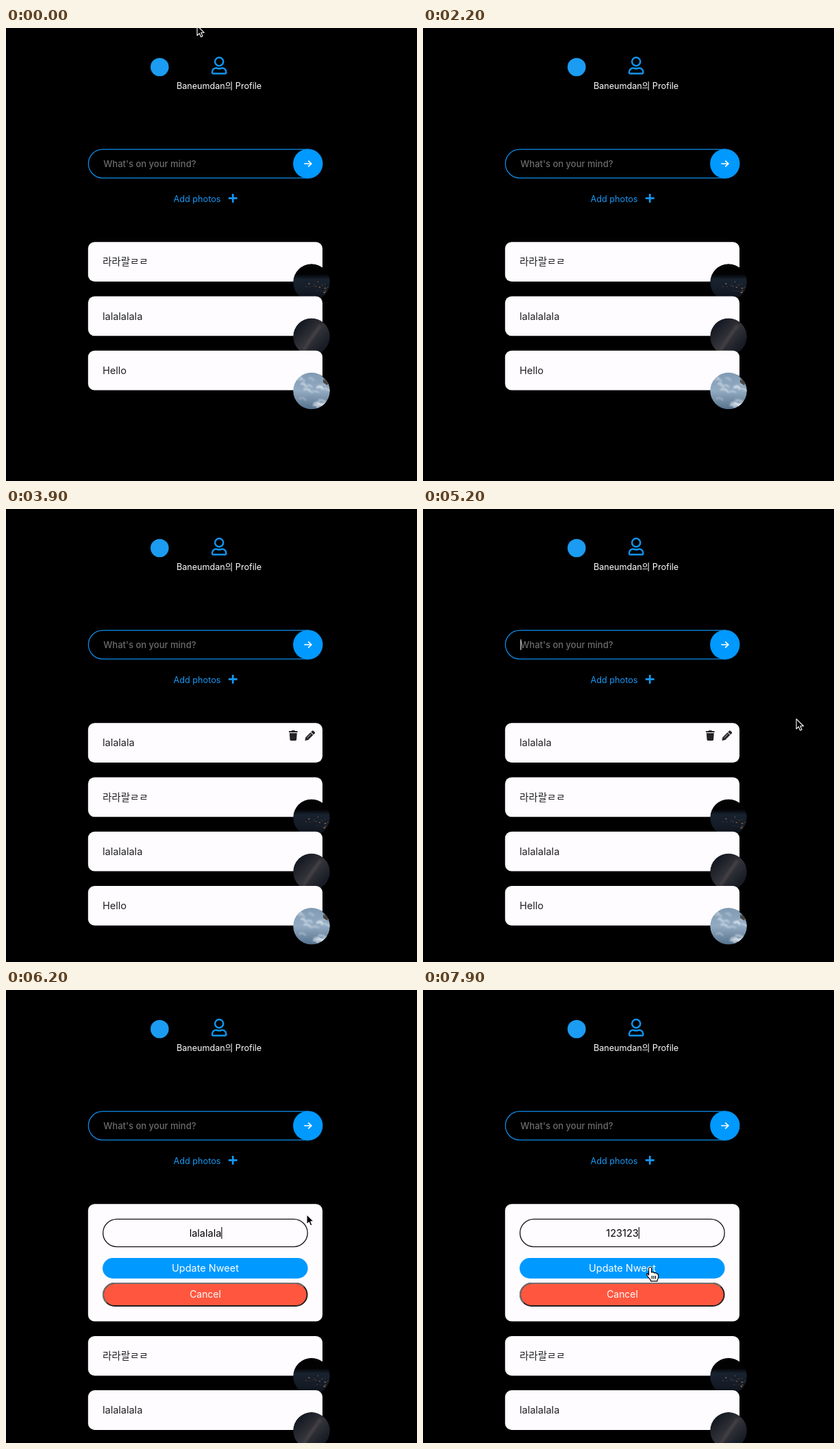
These frames come from a looping animation (600 px wide and 661 px high, 8 s). An HTML page:

```html
<!DOCTYPE html>
<html lang="en">
<head>
<meta charset="utf-8">
<title>Post feed</title>
<style>
  html, body { margin: 0; width: 100%; height: 100%; overflow: hidden; background: #000; }
  svg { display: block; width: 600px; height: 661px; }
  text { font-family: Inter, "Noto Sans CJK KR", "Noto Sans CJK", sans-serif; white-space: pre; }
  .post { font-size: 14.5px; fill: #1f1f21; }
  .mid { text-anchor: middle; }
</style>
</head>
<body>
<svg viewBox="0 0 600 661">
  <defs>
    <clipPath id="disc"><circle r="26.8"/></clipPath>
    <linearGradient id="night" x1="0" y1="0" x2="0" y2="1">
      <stop offset=".28" stop-color="#020203"/>
      <stop offset=".42" stop-color="#18222f"/>
      <stop offset=".75" stop-color="#141b26"/>
      <stop offset="1" stop-color="#0b0f16"/>
    </linearGradient>
    <linearGradient id="sky" x1="0" y1="0" x2="1" y2="1">
      <stop offset=".2" stop-color="#171b23"/>
      <stop offset=".5" stop-color="#34343b"/>
      <stop offset=".8" stop-color="#181c25"/>
    </linearGradient>
    <linearGradient id="earth" x1="0" y1="0" x2="0" y2="1">
      <stop offset="0" stop-color="#7f9bb3"/>
      <stop offset=".5" stop-color="#93abc2"/>
      <stop offset="1" stop-color="#55718c"/>
    </linearGradient>
    <filter id="soft"><feGaussianBlur stdDeviation="1.3"/></filter>

    <g id="photo0" clip-path="url(#disc)">
      <circle r="27" fill="url(#night)"/>
      <g id="lights" fill="#d98a52"/>
    </g>
    <g id="photo1" clip-path="url(#disc)">
      <circle r="27" fill="url(#sky)"/>
      <path d="M-12 20L13-17" stroke="#5a5050" stroke-width="5" opacity=".45" filter="url(#soft)"/>
    </g>
    <g id="photo2" clip-path="url(#disc)">
      <circle r="27" fill="url(#earth)"/>
      <g id="clouds" stroke="#e6edf3" fill="none" stroke-linecap="round" filter="url(#soft)"/>
      <path d="M8-28Q18-20 28-6V-28z" fill="#15181d"/>
      <path d="M17-17l8 4-2 5-6-4z" fill="#4b4543"/>
    </g>
  </defs>

  <rect width="600" height="661"/>

  <circle cx="224.3" cy="57" r="13.3" fill="#1b9cf2"/>
  <g transform="translate(299.8 41.8) scale(.0508)" fill="none" stroke="#1195f0" stroke-width="48">
    <circle cx="224" cy="144" r="120"/>
    <path d="M134 328c20 0 40 16 90 16s70-16 90-16a110 110 0 0 1 110 110v26a24 24 0 0 1-24 24H48a24 24 0 0 1-24-24v-26A110 110 0 0 1 134 328z"/>
  </g>
  <text class="mid" x="311" y="89.3" font-size="12.6" fill="#fff">Baneumdan의 Profile</text>

  <circle cx="440.5" cy="198" r="21.4" fill="#0099ff"/>
  <rect x="120.3" y="177.2" width="341.6" height="41.6" rx="20.8" fill="none" stroke="#0f90ee" stroke-width="1.2"/>
  <path d="M435.3 198H445.6M441.2 193.6L445.8 198L441.2 202.4" fill="none" stroke="#fff" stroke-width="1.7"/>
  <text id="draft" x="142.3" y="202.6" font-size="13" font-weight="500"></text>
  <rect id="caret" y="190.3" width="1.1" height="15.4" fill="#fff"/>

  <text x="244.4" y="254.4" font-size="12.7" fill="#1797f2">Add photos</text>
  <path d="M324.8 248.3H337.6M331.2 241.9V254.7" stroke="#1797f2" stroke-width="2.7"/>

  <g id="fresh">
    <rect x="119.8" y="312.3" width="342.2" height="57.8" rx="9.5" fill="#fffcff"/>
    <text class="post" x="141" y="346.4">lalalala</text>
    <g fill="#242427">
      <path d="M413 324h3.6l.8-1h3.8l.8 1h3.6v1.9H413z"/>
      <path d="M413.8 326.9h11l-.7 9.7q-.1 1.4-1.5 1.4h-6.6q-1.4 0-1.5-1.4z"/>
      <g transform="translate(436.4 338) rotate(-45)">
        <path d="M0 0L4-2.7H14.2V2.7H4zM15.2-2.7h2.4q1.4 0 1.4 1.4v2.6q0 1.4-1.4 1.4h-2.4z"/>
        <path d="M5-.6H13" stroke="#fffcff" stroke-width=".7"/>
      </g>
    </g>
  </g>

  <g id="editor">
    <rect x="119.8" y="312.3" width="342.2" height="171.2" rx="9.5" fill="#fffcff"/>
    <rect x="141.6" y="334.3" width="298.6" height="40.4" rx="20.2" fill="#fffcff" stroke="#111" stroke-width="1.3"/>
    <text id="edit" class="mid" x="291" y="359.9" font-size="14.5"></text>
    <rect id="editCaret" y="346" width="1.1" height="17" fill="#000"/>
    <rect x="141" y="391" width="299.6" height="30" rx="15" fill="#0099ff"/>
    <text class="mid" x="291" y="411.4" font-size="14.5" fill="#fff">Update Nweet</text>
    <rect x="142" y="428" width="297.6" height="33" rx="16.5" fill="#ff573f" stroke="#231f1f" stroke-width="2"/>
    <path d="M146.8 456.2A16.5 16.5 0 0 1 158.5 428H423.1A16.5 16.5 0 0 1 434.8 432.8" fill="none" stroke="#74706f" stroke-width="2"/>
    <text class="mid" x="291" y="448.8" font-size="13.9" fill="#fff">Cancel</text>
  </g>

  <g id="feed"></g>

  <g id="arrow"><path d="M0 0V14.5l3.3-3.2 2.3 5.2 2.4-1-2.2-5.2h4.6z" stroke="#fff" stroke-width="1.1" stroke-linejoin="round"/></g>
  <g id="hand" stroke="#000" stroke-width="1.2" stroke-linejoin="round">
    <path fill="#fff" d="M-2 1.5a2 2 0 0 1 4 0V7q3-1 4 .8q3-.6 3.6 1q2.4 0 2.4 2.5v3q0 2-1.5 4v1.5H1v-1.5q-4-4-5.5-7q-1-3 1-2.5l1.5 2z"/>
    <path fill="none" d="M2.8 12v4.5M5.4 12v4.5M8 12v4.5"/>
  </g>
</svg>
<script>
const NS = 'http://www.w3.org/2000/svg';
const LOOP = 8000, STEP = 100, ROW = 79.2, TOP = 312.3;
const $ = id => document.getElementById(id);

function add(parent, tag, attrs, text) {
  const node = document.createElementNS(NS, tag);
  for (const k in attrs) node.setAttribute(k, attrs[k]);
  if (text) node.textContent = text;
  parent.appendChild(node);
  return node;
}
const show = (node, on) => node.setAttribute('display', on ? 'inline' : 'none');
const moveTo = (node, x, y) => node.setAttribute('transform', `translate(${x} ${y})`);

let seed = 7;
const rnd = () => (seed = seed * 16807 % 2147483647) / 2147483647;

for (let i = 0; i < 26; i++) {
  const x = rnd() * 48 - 24;
  add($('lights'), 'circle', {
    cx: x, cy: 5 + x * x / 90 + (rnd() - .5) * 15,
    r: .35 + rnd() * .7, opacity: .25 + rnd() * .6
  });
}
for (let i = 0; i < 22; i++) {
  const x = rnd() * 50 - 28, y = rnd() * 44 - 20;
  add($('clouds'), 'path', {
    d: `M${x} ${y}q${3 + rnd() * 4} ${-5 + rnd() * 5} ${5 + rnd() * 7} ${rnd() * 4}`,
    'stroke-width': 1 + rnd() * 2.5, opacity: .3 + rnd() * .5
  });
}

const posts = ['라라랄ㄹㄹ', 'lalalalala', 'Hello'].map((text, i) => {
  const g = add($('feed'), 'g', {});
  add(g, 'rect', { x: 119.8, width: 342.2, height: 57.8, rx: 9.5, fill: '#fffcff' });
  add(g, 'text', { class: 'post', x: 141, y: 34.1 }, text);
  add(g, 'use', { href: '#photo' + i, x: 446, y: 58.8 });
  return g;
});

// Last entry of [time, value] pairs already reached
const at = (list, t) => list.reduce((v, [time, value]) => t >= time ? value : v, list[0][1]);
const typed = [[0, 0], [2400, 1], [2500, 2], [2600, 3], [2700, 4], [2900, 6], [3000, 7], [3100, 8], [3400, 0]];
const edits = [[0, 'lalalala'], [6500, 'lalala'], [6600, 'lala'], [6700, 'la'], [6800, ''],
  [7000, '1'], [7100, '12'], [7200, '123'], [7300, '1231'], [7400, '12312'], [7500, '123123']];

const trips = [
  { from: 0, to: 700, end: 700, a: [279, -3.5], b: [205, 198] },
  { from: 4900, to: 5700, end: 6200, a: [592, 296], b: [443.5, 329] },
  { from: 6200, to: 6300, end: 6700, a: [439, 327.5], b: [438, 329] },
  { from: 7500, to: 7900, end: 8000, a: [426, 334], b: [331.5, 405] }
];

function pointer(t) {
  const trip = trips.find(p => t >= p.from && t < p.end);
  if (!trip) return null;
  const p = Math.min(1, (t - trip.from) / (trip.to - trip.from));
  const k = p * p * (3 - 2 * p);
  return [0, 1].map(i => trip.a[i] + (trip.b[i] - trip.a[i]) * k);
}

function drawPointer(t, editing) {
  const pos = pointer(t);
  let hand = false, beam = false;
  if (pos) {
    const [x, y] = pos;
    hand = editing ? y > 391 && y < 421 : t > 4000 && x < 452 && y > 322;
    beam = t < 1000 && y > 177;
    moveTo($('arrow'), x, y);
    moveTo($('hand'), x, y);
  }
  show($('arrow'), pos && !hand && !beam);
  show($('hand'), hand);
}

function caretOn(t) {
  if (t < 700 || t >= 5600) return false;
  if (t >= 2400 && t < 3600) return true;
  return t < 2400 ? (t - 700) % 1000 < 500 : (t - 4100) % 1000 >= 0 && (t - 4100) % 1000 < 500;
}

function render(ms) {
  const t = Math.floor(ms % LOOP / STEP) * STEP;
  const posted = t >= 3400, editing = t >= 6200;

  const n = at(typed, t), draft = $('draft');
  draft.textContent = n ? 'lalalala'.slice(0, n) : "What's on your mind?";
  draft.setAttribute('fill', n ? '#fff' : '#6c6c6c');
  $('caret').setAttribute('x', 142.3 + (n ? draft.getComputedTextLength() : 0));
  show($('caret'), caretOn(t));

  show($('fresh'), posted && !editing);
  show($('editor'), editing);
  if (editing) {
    const value = at(edits, t);
    $('edit').textContent = value;
    const half = value ? $('edit').getComputedTextLength() / 2 : 0;
    $('editCaret').setAttribute('x', 291 + half);
  }

  const first = editing ? 504.9 : posted ? TOP + ROW : TOP;
  posts.forEach((g, i) => moveTo(g, 0, first + i * ROW));
  drawPointer(t, editing);
}

const start = performance.now();
function tick() {
  render(performance.now() - start);
  requestAnimationFrame(tick);
}
tick();
</script>
</body>
</html>
```
